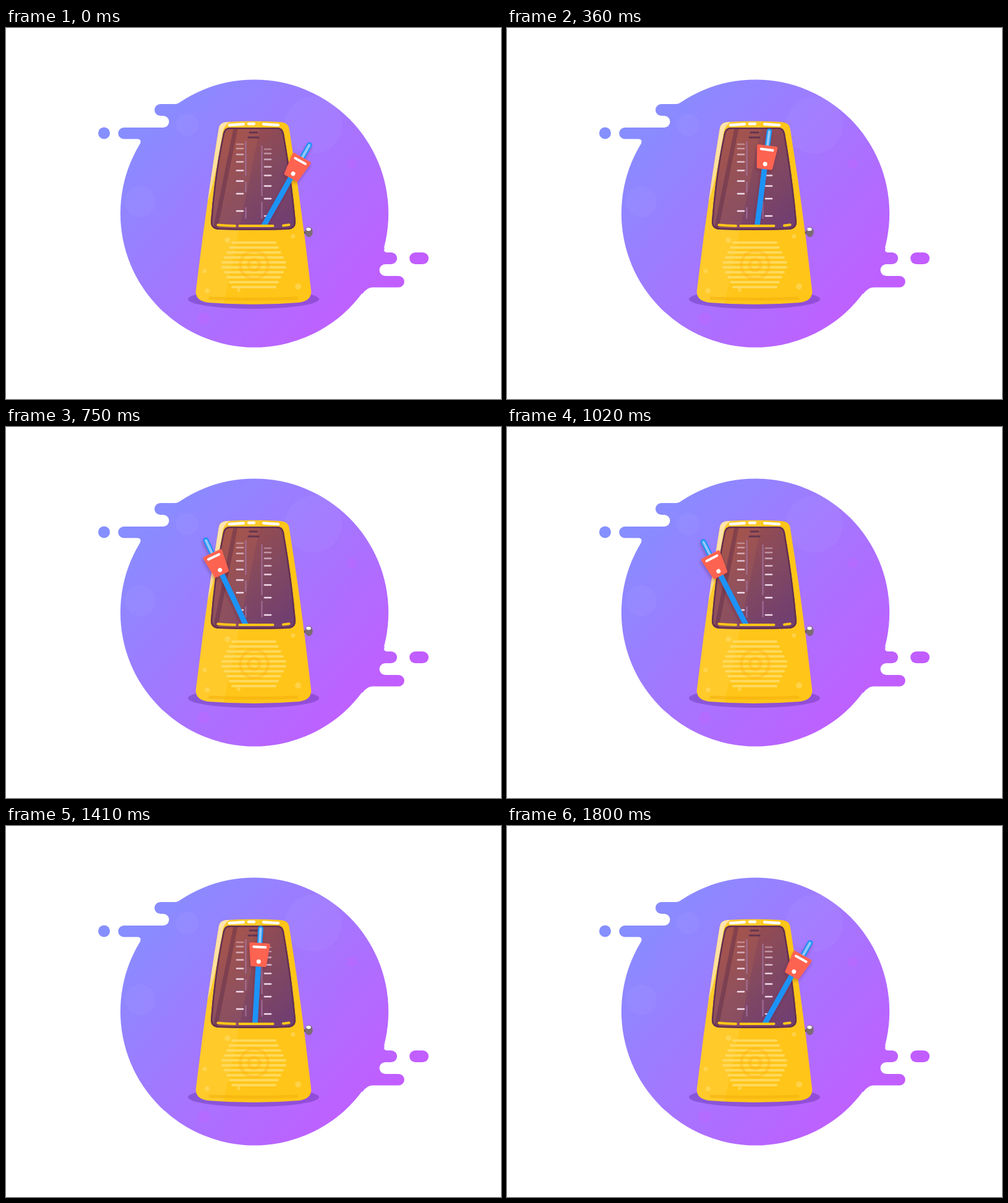
Write an HTML page that moves like this. It is 800 px wide and 600 px high and loops after 1830 ms.

```html
<!DOCTYPE html>
<html lang="en">
<head>
<meta charset="utf-8">
<title>Metronome</title>
<style>
  html, body { margin: 0; width: 100%; height: 100%; overflow: hidden; background: #fff; }
  svg { display: block; width: 800px; height: 600px; }
  .round { fill: none; stroke-linecap: round; }
</style>
</head>
<body>
<svg viewBox="0 0 800 600">
  <defs>
    <linearGradient id="violet" gradientUnits="userSpaceOnUse" x1="210" y1="125" x2="590" y2="475">
      <stop offset="0" stop-color="#858fff"/>
      <stop offset=".5" stop-color="#a476ff"/>
      <stop offset="1" stop-color="#c35cff"/>
    </linearGradient>
    <linearGradient id="glass" gradientUnits="userSpaceOnUse" x1="345" y1="190" x2="455" y2="310">
      <stop offset="0" stop-color="#9c4d4c"/>
      <stop offset=".5" stop-color="#83495f"/>
      <stop offset="1" stop-color="#713f70"/>
    </linearGradient>
    <linearGradient id="cream" gradientUnits="userSpaceOnUse" x1="0" y1="155" x2="0" y2="290">
      <stop offset="0" stop-color="#ffe4ae"/>
      <stop offset="1" stop-color="#ffdc8c"/>
    </linearGradient>
    <filter id="soft" x="-60%" y="-20%" width="220%" height="140%">
      <feDropShadow dx="-1" dy="3" stdDeviation="2.5" flood-color="#5a2030" flood-opacity=".35"/>
    </filter>
    <path id="case" d="M344 162Q346 152 358 152Q400 149.5 442 152Q455 152 457.5 162Q478 290 493 424Q495 441 474 444Q400 450 326 444Q305 441 307 424Q323 290 344 162Z"/>
    <path id="window" d="M362 161H438Q447 161 449 170Q462 245 468 312Q469 325 455 326Q400 328 344 326Q330 325 331 312Q337 235 351 170Q353 161 362 161Z"/>
    <clipPath id="inCase"><use href="#case"/></clipPath>
    <clipPath id="inWindow"><use href="#window"/></clipPath>
    <clipPath id="aboveSlot"><rect width="800" height="318"/></clipPath>
  </defs>

  <!-- Backdrop -->
  <g fill="url(#violet)">
    <circle cx="401.5" cy="300" r="216.6"/>
    <path d="M287 117Q279 123 272 123H249.5a9.5 9.5 0 0 0 0 19H254a9.5 9.5 0 0 1 0 19H190.5a9.25 9.25 0 0 0 0 18.5H213Q219 180 217 186L300 210Z"/>
    <path d="M612 355Q609 363 616 363H622.5a9.5 9.5 0 0 1 0 19H613a9.5 9.5 0 0 0 0 19H634.5a9.25 9.25 0 0 1 0 18.5H592Q583 420 576 430L540 400Z"/>
    <circle cx="158.5" cy="170" r="9.5"/>
    <rect x="652" y="363" width="31" height="19" rx="9.5"/>
  </g>
  <rect x="225" y="142" width="38.5" height="19" rx="9.5" fill="#fff"/>
  <g fill="#fff" opacity=".035">
    <circle cx="497" cy="157" r="46"/>
    <circle cx="217" cy="281" r="25"/>
    <circle cx="293" cy="157" r="18"/>
  </g>
  <g fill="#d45cff" opacity=".22">
    <circle cx="320" cy="470" r="10"/>
    <circle cx="559" cy="220" r="8"/>
  </g>

  <!-- Case -->
  <ellipse cx="400" cy="438.5" rx="106" ry="15.5" fill="#5a2ca0" opacity=".4"/>
  <path d="M480 331H486" stroke="#5c4a60" stroke-width="4"/>
  <ellipse cx="489.5" cy="330" rx="6.2" ry="8.3" fill="#7d6b76"/>
  <ellipse cx="489" cy="325.5" rx="3.8" ry="2.8" fill="#f5eff5"/>
  <use href="#case" fill="#ffc518"/>
  <g clip-path="url(#inCase)">
    <path d="M300 140H415L351 450H300Z" fill="#fff" opacity=".08"/>
    <path d="M340 150H364Q352 157 350 169Q340 240 323 290Q333 220 340 150Z" fill="url(#cream)"/>
  </g>
  <path class="round" d="M330 437Q400 440 470 437" stroke="#f5b40f" stroke-width="5" opacity=".65"/>
  <path class="round" d="M361 157L384 155.5M392 155H401M416 155.5L440 157" stroke="#fff" stroke-width="4.3"/>
  <g fill="#ffdc68" opacity=".6">
    <circle cx="358" cy="343" r="4.5"/>
    <circle cx="464" cy="337" r="3.5"/>
    <circle cx="472" cy="418" r="5"/>
    <circle cx="321" cy="393" r="3.5"/>
    <circle cx="325" cy="425" r="4"/>
    <circle cx="376" cy="424" r="3"/>
  </g>
  <g id="grille" class="round" stroke="#ffd95c" stroke-width="4"></g>
  <g fill="none" stroke="#ffb414" stroke-width="5" opacity=".38">
    <circle cx="401" cy="383" r="22.5"/>
    <circle cx="401" cy="383" r="9"/>
  </g>

  <!-- Window -->
  <use href="#window" fill="url(#glass)"/>
  <g clip-path="url(#inWindow)">
    <path d="M340 155H412L376 330H325Z" fill="#ff9a50" opacity=".09"/>
    <path d="M369 155H376L341 330H334Z" fill="#54264a" opacity=".4"/>
    <use href="#window" fill="none" stroke="#633052" stroke-width="5"/>
  </g>
  <path class="round" d="M394 169H406M392 177H408" stroke="#633450" stroke-width="3"/>
  <path class="round" d="M387.5 184V238M387.5 249V265M387.5 291V307M413.5 191V271M413.5 282V307" stroke="#a573a0" stroke-width="2.4" opacity=".75"/>
  <g id="ticks" class="round" stroke="#f3dcee" stroke-width="2.7"></g>
  <path class="round" d="M342.5 318.5Q355 319.8 370 320M377.5 320H431.5M448 319.5L457.5 318.3" stroke="#ffc518" stroke-width="4"/>

  <!-- Pendulum, drawn upright around its pivot -->
  <g clip-path="url(#aboveSlot)">
    <g filter="url(#soft)">
      <g id="arm">
        <path class="round" d="M0 0V-182.5" stroke="#1a93f8" stroke-width="8.6"/>
        <path class="round" d="M0 -158V-182" stroke="#92c6fa" stroke-width="4.2"/>
        <path d="M-14.5 -157H14.5L10.5 -123H-10.5Z" fill="#fd6451" stroke="#fd6451" stroke-width="4.5" stroke-linejoin="round"/>
        <path class="round" d="M-9.5 -152.5H9.5" stroke="#fff" stroke-width="4"/>
        <circle cy="-129" r="3.5" fill="#fff"/>
      </g>
    </g>
  </g>
</svg>
<script>
  const LOOP = 1830, STEP = 30, LEAD = 30, HALF = 936, SWING = 29.6;
  const $ = id => document.getElementById(id);

  const bar = (x1, x2, y, opacity = 1) =>
    `<path d="M${x1} ${y}H${x2}" opacity="${opacity}"/>`;

  let rows = "";
  for (let y = 347; y <= 419; y += 8) {
    const half = 53 - Math.abs(y - 383) / 2;
    rows += bar(401 - half, 400 + half, y);
  }
  $("grille").innerHTML = rows;

  $("ticks").innerHTML = [188, 195, 204.5, 216.5, 230.5, 247.5, 268, 296].map((y, i) => {
    const opacity = Math.min(1, 0.4 + i * 0.13);
    return bar(373, 383, y, opacity) + bar(418, 428, y + 8, opacity);
  }).join("");

  const ease = s => s * s * (3 - 2 * s);

  function draw(now) {
    const t = Math.floor(now % LOOP / STEP) * STEP + LEAD;
    const away = t < HALF ? ease(t / HALF) : 1 - ease(t / HALF - 1);
    const angle = SWING * (1 - 2 * away);
    $("arm").setAttribute("transform", `translate(400.7 348) rotate(${angle})`);
    requestAnimationFrame(() => draw(performance.now()));
  }
  draw(0);
</script>
</body>
</html>
```
